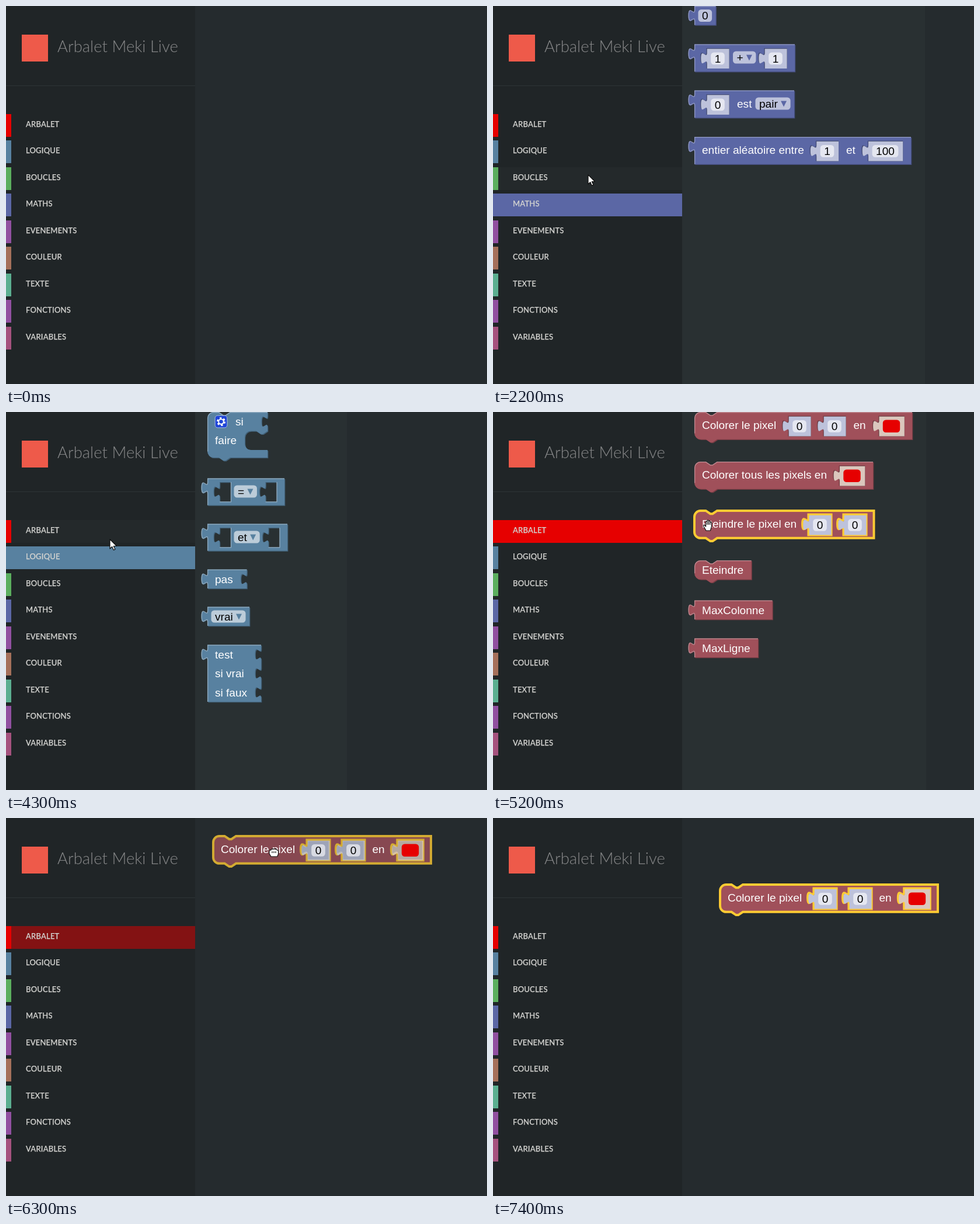
Recreate the animation shown at these times as an HTML page. Size 824 px wide and 647 px high, loop 8.3 s.

```html
<!DOCTYPE html>
<html lang="fr">
<head>
<meta charset="utf-8">
<title>Arbalet Meki Live</title>
<style>
html, body { margin: 0; width: 100%; height: 100%; overflow: hidden; background: #252b2e; }
svg { display: block; width: 824px; height: 647px; }
.brand { font: 300 27.5px Raleway, Lato, sans-serif; fill: #88898a; }
.menu { font: 500 13px Raleway, Lato, sans-serif; letter-spacing: .2px; fill: #d3d3d0; stroke: #d3d3d0; stroke-width: .25; }
.block text { font: 19.07px "Liberation Sans", Arial, sans-serif; fill: #fff; white-space: pre; }
.block .value { fill: #000; }
.field { fill: #fff; fill-opacity: .6; }
.light { fill: none; stroke-width: 1.3; }
.selected > .main { stroke: #fc3; stroke-width: 3.9; }
.selected > .light { display: none; }
.dragging .main, .dragging .shadow { opacity: .8; }
.dragging .dark { display: none; }
</style>
</head>
<body>
<svg id="stage" viewBox="0 0 824 647" xmlns="http://www.w3.org/2000/svg"></svg>
<script>
const LOOP = 8300, STEP = 100;
const stage = document.getElementById('stage');
const ruler = document.createElement('canvas').getContext('2d');
ruler.font = '19.07px "Liberation Sans", Arial, sans-serif';
const textWidth = s => ruler.measureText(s).width;

const mix = (hex, to, k) => '#' + [1, 3, 5].map(i => {
  const v = parseInt(hex.slice(i, i + 2), 16);
  return Math.round(v + (to - v) * k).toString(16).padStart(2, '0');
}).join('');

// Outline pieces of the puzzle blocks
const NOTCH = 'l7.8 5.2h3.9l7.8-5.2';
const NOTCH_BACK = 'l-7.8 5.2h-3.9l-7.8-5.2';
const TAB = 'v6.5c0 13-10.4-10.4-10.4 9.75s10.4-3.25 10.4 9.75';
const TAB_UP = 'V26c0-13-10.4 10.4-10.4-9.75s10.4 3.25 10.4-9.75';
const MOUTH = `${NOTCH_BACK}h-9.1a10.4 10.4 0 0 0-10.4 10.4v11.7a10.4 10.4 0 0 0 10.4 10.4`;

function outline({ w, h, out, flat, tabs = 0, mouth, arm }) {
  let d = out ? 'M0 0' : `M0 10.4a10.4 10.4 0 0 1 10.4-10.4H19.5${NOTCH}`;
  d += `H${w}` + (TAB + 'v6.5').repeat(tabs);
  if (mouth) d += `V${mouth}H103${MOUTH}H${arm}`;
  d += `V${h}`;
  if (out) return d + `H0${TAB_UP}z`;
  return d + (flat ? '' : `H39${NOTCH_BACK}`) + 'H10.4a10.4 10.4 0 0 1-10.4-10.4z';
}

const edge = ({ w, h, out }) => out
  ? `M.6 ${h}${TAB_UP}V.6H${w}`
  : `M.6 ${h - 10.4}V10.4a9.8 9.8 0 0 1 9.8-9.8H19.5${NOTCH}H${w}`;

// Parts: each returns markup, sockets also cut a hole in their block
const label = (x, s, cy = 16.5, cls = '') =>
  ({ svg: `<text x="${x}" y="${cy + 6.8}" class="${cls}">${s}</text>` });

const box = (x, w, cy) =>
  `<rect class="field" x="${x - 6.5}" y="${cy - 10.4}" width="${w + 13}" height="20.8" rx="5.2"/>`;

const input = (x, s, cy = 16.5) =>
  ({ svg: box(x, textWidth(s), cy) + label(x, s, cy, 'value').svg });

function menu(x, s, cy = 16.5) {
  const tw = textWidth(s), ax = x + tw + 5.3;
  return { svg: box(x, tw + 15.3, cy) + label(x, s, cy, 'value').svg +
    `<path fill="currentColor" d="M${ax} ${cy - 4.5}h10l-5 10z"/>` };
}

function socket(x, y, w, h, light) {
  return {
    hole: `M${x} ${y}${TAB}V${y + h}h${w}V${y}z`,
    svg: `<path class="light" stroke="${light}" d="M${x} ${y + h}h${w}V${y}"/>`
  };
}

function shadow(cx, w, color, content) {
  const x = cx - w / 2, fill = mix(color, 255, .6);
  const d = outline({ w: w + 1.3, h: 33.8, out: true });
  return {
    hole: socket(x - 1.3, 6.5, w + 2.6, 35.1).hole,
    svg: `<path class="shadow" transform="translate(${x} 7.8)" fill="${fill}" d="${d}"/>` + content
  };
}

function num(cx, s) {
  const tw = textWidth(s);
  return shadow(cx, tw + 26, '#5b67a5', input(cx - tw / 2, s, 24.3).svg);
}

const swatch = cx => shadow(cx, 42, '#a5745b',
  `<rect x="${cx - 14.7}" y="13.6" width="29.4" height="21.4" rx="5.2" fill="#e60000"/>`);

const gear = { svg: `<g transform="translate(23.5 16.5)">
  <rect x="-10.4" y="-10.4" width="20.8" height="20.8" rx="4.5" fill="#1f45d8" stroke="#a9bce0"/>
  <circle r="4.3" fill="none" stroke="#fff" stroke-width="2"/>
  <circle r="6.3" fill="none" stroke="#fff" stroke-width="2.4" stroke-dasharray="3.3 3.3"/></g>` };

function block(color, y, shape, ...parts) {
  const d = outline(shape) + parts.map(p => p.hole || '').join('');
  return `<g class="block" color="${color}" transform="translate(345 ${y})">
    <path class="dark" fill="${mix(color, 0, .25)}" fill-rule="evenodd" transform="translate(1.3 1.3)" d="${d}"/>
    <path class="main" fill="${color}" fill-rule="evenodd" d="${d}"/>
    <path class="light" stroke="${mix(color, 255, .35)}" d="${edge(shape)}"/>
    ${parts.map(p => p.svg).join('')}</g>`;
}

const RED = '#a0505a', BLUE = '#5881a0', GREEN = '#5bae5e', INDIGO = '#5b67a5';
const BLUE_LIGHT = mix(BLUE, 255, .35);
const MID = 22.5;
const stmt = (w, h = 32.5, more) => ({ w, h, ...more });
const value = (w, h = 32.5, more) => ({ w, h, out: true, ...more });
const gap = x => socket(x, 6.5, 19.5, 33.8, BLUE_LIGHT);

const colorPixel = () => block(RED, 0, stmt(373, 46.8), label(13, 'Colorer le pixel', MID),
  num(180, '0'), num(240, '0'), label(272.5, 'en', MID), swatch(337.5));

const flyouts = [
  { right: 742, blocks: [
    colorPixel(),
    block(RED, 85, stmt(306, 46.8), label(13, 'Colorer tous les pixels en', MID), swatch(270)),
    block(RED, 169, stmt(307.5, 46.8), label(13, 'Eteindre le pixel en', MID), num(215, '0'), num(275, '0')),
    block(RED, 254, stmt(97.5), label(13, 'Eteindre')),
    block(RED, 322.5, value(133.5), label(13, 'MaxColonne')),
    block(RED, 387.5, value(109), label(13, 'MaxLigne'))
  ] },
  { right: 584, blocks: [
    block(BLUE, 0, stmt(103, 78, { tabs: 1, mouth: 32.5, arm: 103 }), gear, label(48, 'si'), label(13, 'faire', 48)),
    block(BLUE, 113.5, value(132, 46), gap(21), menu(52, '=', MID), gap(99.5)),
    block(BLUE, 191.5, value(137, 46), gap(21), menu(52, 'et', MID), gap(104.5)),
    block(BLUE, 269.5, value(67.5, 32.5, { tabs: 1 }), label(13, 'pas')),
    block(BLUE, 333.5, value(72), menu(13, 'vrai')),
    block(BLUE, 398.5, value(92, 97.5, { tabs: 3 }), label(13, 'test'), label(13, 'si vrai', 49), label(13, 'si faux', 81.5))
  ] },
  { right: 824, blocks: [
    block(GREEN, 0, stmt(200, 92.3, { mouth: 46.8, arm: 103 }), label(13, 'répéter', MID), num(118.5, '10'),
      label(157, 'fois', MID), label(13, 'faire', 63.5)),
    block(GREEN, 130.5, stmt(194, 78, { tabs: 1, mouth: 32.5, arm: 194 }), label(13, 'répéter'),
      menu(86, 'tant que'), label(13, 'faire', 48.5)),
    block(GREEN, 245, stmt(462, 92.3, { mouth: 46.8, arm: 103 }), label(13, 'compter avec', MID), menu(140.5, 'i', MID),
      label(172, 'de', MID), num(234, '0'), label(266.5, 'à', MID), num(323, '10'),
      label(361, 'par', MID), num(428.5, '1'), label(13, 'faire', 63.5)),
    block(GREEN, 375, stmt(176, 32.5, { flat: true }), menu(13, 'quitter la boucle')),
    block(GREEN, 443, stmt(172), label(13, 'Attendre'), input(97.6, '0'), menu(134.5, 's'))
  ] },
  { right: 740, blocks: [
    block(INDIGO, 0, value(36.6), input(13, '0')),
    block(INDIGO, 65.5, value(172, 46.8), num(40, '1'), menu(72.5, '+', MID), num(139, '1')),
    block(INDIGO, 144.5, value(171, 46.8), num(40, '0'), label(73, 'est', MID), menu(111, 'pair', MID)),
    block(INDIGO, 224, value(371, 46.8), label(13, 'entier aléatoire entre', MID), num(227.5, '1'),
      label(260, 'et', MID), num(327, '100'))
  ] }
];

const categories = [
  ['ARBALET', '#e60000'], ['LOGIQUE', '#5881a0'], ['BOUCLES', '#5bae5e'],
  ['MATHS', '#5b67a5'], ['EVENEMENTS', '#9150a0'], ['COULEUR', '#a5705b'],
  ['TEXTE', '#5bae90'], ['FONCTIONS', '#9150a0'], ['VARIABLES', '#a5527e']
];
const rowTop = i => Math.floor(185 + 45.5 * i);

const rows = categories.map(([name, color], i) => `<g transform="translate(0 ${rowTop(i)})">
  <rect class="hover" width="324" height="39" fill="#fff" opacity="0"/>
  <rect class="fill" width="324" height="39" fill="${color}" opacity="0"/>
  <rect width="9" height="39" fill="${color}"/>
  <text class="menu" x="34" y="22">${name}</text></g>`).join('');

const cursors = [
  'M0 0V16l3.7-3.5 2.6 5.8 2.6-1.2-2.6-5.6h5.2z',
  'M-4 9l-4-7q-1-3.5 1.6-2.2l2 2.2V-6q1.2-2 2.4 0V-8q1.2-2 2.4 0v1q1.2-1.6 2.4 0v2q1.4-1.4 2.6 0v7l-2 7zM-2-6v5M.4-7v6M2.8-6v5',
  'M-8 0q0-4 3-2.900q1-3.400 3.500-1.400q1.700-2 3.500 0q2-1.400 3.200 1.200q2.300-.4 2.300 2.300v4.600l-1.700 4.200H-5L-8 3zM-3-1v3M0-1v3M3-1v3'
];

stage.innerHTML = `
  <rect width="824" height="647" fill="#252b2e"/>
  ${flyouts.map(f => `<g class="flyout"><rect x="324" width="${f.right - 324}" height="647" fill="#293032"/>${f.blocks.join('')}</g>`).join('')}
  <g id="dropped">${colorPixel()}</g>
  <rect width="324" height="647" fill="#202527"/>
  <rect y="136" width="324" height="1" fill="#2e3436"/>
  <rect x="27" y="49" width="45" height="46" fill="#ee5a4a"/>
  <text class="brand" x="88" y="79">Arbalet Meki Live</text>
  ${rows}
  <path id="cursor" fill="#fff" stroke="#101010" stroke-width="1.2" stroke-linejoin="round"/>`;

const all = s => [...stage.querySelectorAll(s)];
const hovers = all('.hover'), fills = all('.fill'), panels = all('.flyout');
const tools = [...panels[0].querySelectorAll('.block')];
const dropped = stage.querySelector('#dropped'), copy = dropped.firstElementChild;
const cursor = stage.querySelector('#cursor');
copy.classList.add('selected');

// Opened category: [time, index]
const opened = [[0, -1], [1300, 3], [2500, 2], [3600, 1], [4800, 0], [6300, -1]];

// Pointer: [time, x, y, shape, highlighted block]
const ARROW = 0, HAND = 1, GRAB = 2;
const pointer = [
  [600, 497, 147], [700, 415, 196], [800, 322, 262], [900, 236, 322], [1000, 184, 356], [1100, 166, 348],
  [1800, 167, 340], [1900, 168, 328], [2000, 167, 313], [2100, 165, 299], [2200, 163, 289],
  [3000, 164, 280], [3100, 165, 270], [3400, 168, 262], [3500, 172, 265],
  [4100, 174, 252], [4200, 177, 234], [4300, 178, 218], [4400, 180, 200], [4500, 180, 188], [4700, 182, 190],
  [5100, 262, 193], [5200, 369, 194, HAND, 2], [5300, 388, 271, HAND, 3], [5400, 428, 340, HAND, 4],
  [5500, 470, 399], [5600, 490, 300], [5700, 525, 195, HAND, 2], [5800, 560, 112, HAND, 1],
  [5900, 587, 54, HAND, 0], [6000, 522, 43, HAND, 0], [6100, 451, 35, HAND, 0],
  [7000, 497, 149, HAND], [7200, 605, 105], [7300, 219, 7]
];

// Dragged block: [time, dx, dy]
const drag = [[6300, 10, 31], [6400, 20, 60], [6500, 31, 85], [6600, 42, 104], [6700, 48, 115], [6800, 47, 117], [7000, 44, 114]];

const last = (keys, t) => keys.findLast(k => k[0] <= t);
const show = (el, on) => el.setAttribute('display', on ? 'inline' : 'none');

function draw(time) {
  const t = Math.floor(time / STEP) * STEP;

  const now = last(opened, t), before = last(opened, now[0] - 1) || now;
  const level = t === now[0] ? .5 : 1;
  fills.forEach((el, i) => el.setAttribute('opacity',
    i === now[1] ? level : i === before[1] ? 1 - level : 0));
  panels.forEach((el, i) => show(el, i === now[1]));

  const move = last(drag, t), held = move && t < 7000;
  show(dropped, move);
  if (move) dropped.setAttribute('transform', `translate(${move[1]} ${move[2]})`);
  copy.classList.toggle('dragging', !!held);

  const key = t < 7400 && last(pointer, t);
  show(cursor, key);
  let [, x, y, shape = ARROW, hot = -1] = key || [];
  if (held) [x, y, shape] = [449 + move[1], 27 + move[2], GRAB];
  if (key) {
    cursor.setAttribute('d', cursors[shape]);
    cursor.setAttribute('transform', `translate(${x} ${y})`);
  }
  tools.forEach((el, i) => el.classList.toggle('selected', i === hot));
  hovers.forEach((el, i) => el.setAttribute('opacity',
    key && x < 324 && y >= rowTop(i) && y < rowTop(i) + 39 ? .02 : 0));
}

const start = performance.now();
(function tick() {
  draw((performance.now() - start) % LOOP);
  requestAnimationFrame(tick);
})();
</script>
</body>
</html>
```
